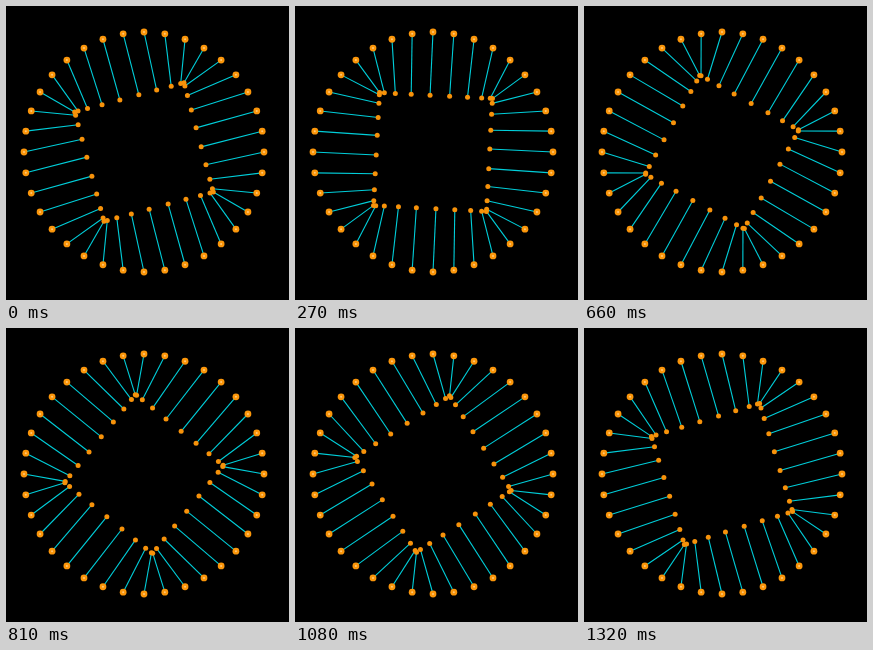
Write an HTML page with a canvas that moves like this. It is 283 px wide and 294 px high and loops after 1.35 s.

```html
<!DOCTYPE html>
<html>
<head>
<meta charset="utf-8">
<style>
  html, body { margin: 0; width: 100%; height: 100%; overflow: hidden; background: #000; }
  canvas { display: block; }
</style>
</head>
<body>
<canvas id="stage" width="283" height="294"></canvas>
<script>
const ctx = document.getElementById('stage').getContext('2d');
const CENTER = { x: 138, y: 146 };
const SPOKES = 36, STEP_MS = 30, STEPS = 45;
const OUTER_RADIUS = 120, HALF_SIDE = 80 * Math.SQRT1_2;
const RAD = Math.PI / 180;

// Angles are in degrees, clockwise from the top.
const polar = (radius, angle) => ({
  x: CENTER.x + radius * Math.sin(angle * RAD),
  y: CENTER.y - radius * Math.cos(angle * RAD),
});

// Point on a square turned by tilt, eased along each side towards the corners.
function squarePoint(angle, tilt) {
  const normal = tilt + 90 * Math.round((angle - tilt) / 90);
  const slide = Math.sin(2 * (angle - normal) * RAD);
  return polar(HALF_SIDE * Math.hypot(1, slide), normal + Math.atan(slide) / RAD);
}

function dot({ x, y }, radius, color) {
  ctx.fillStyle = color;
  ctx.beginPath();
  ctx.arc(x, y, radius, 0, 2 * Math.PI);
  ctx.fill();
}

function draw(now) {
  const step = Math.floor(now / STEP_MS) % STEPS;
  const tilt = step * 90 / STEPS - 15;
  ctx.fillStyle = '#000';
  ctx.fillRect(0, 0, 283, 294);
  ctx.strokeStyle = '#00ced9';
  ctx.lineWidth = 1.1;

  for (let i = 0; i < SPOKES; i++) {
    const angle = i * 360 / SPOKES;
    const outer = polar(OUTER_RADIUS, angle);
    const inner = squarePoint(angle, tilt);
    ctx.beginPath();
    ctx.moveTo(outer.x, outer.y);
    ctx.lineTo(inner.x, inner.y);
    ctx.stroke();
    dot(outer, 3.4, '#fb960a');
    dot(outer, 1, '#ffc878');
    dot(inner, 2.5, '#f7920a');
  }
}

function frame() {
  draw(performance.now());
  requestAnimationFrame(frame);
}
frame();
</script>
</body>
</html>
```
